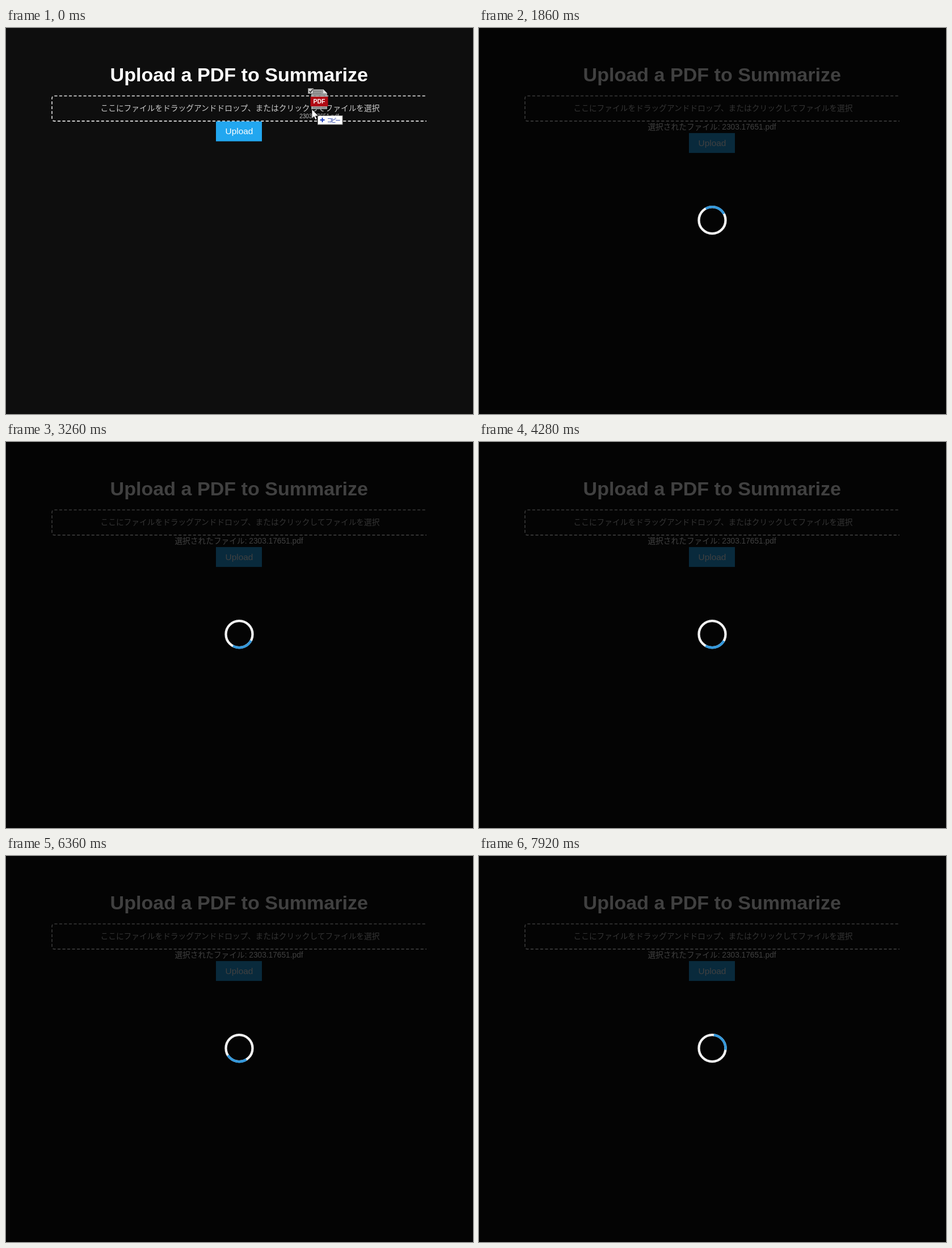
These frames come from a looping animation (823x680 px, 8000 ms). An HTML page:

```html
<!DOCTYPE html>
<html lang="ja">
<head>
<meta charset="utf-8">
<title>Upload a PDF to Summarize</title>
<style>
  html, body { margin: 0; width: 100%; height: 100%; overflow: hidden; background: #0e0e0e; }
  svg { display: block; width: 823px; height: 680px; }
  text { font-family: "Liberation Sans", Arial, "Noto Sans CJK JP", "Noto Sans CJK", sans-serif; font-size: 13.71px; fill: #fff; text-anchor: middle; }
  .title { font-size: 34.1px; font-weight: bold; }
  .hint { fill: #ccc; }
  .button { font-size: 15.43px; }
  .border { fill: none; stroke: #ccc; stroke-width: 1.8; stroke-dasharray: 5.14 3.39; }
  .border.back { stroke-dashoffset: 5.14; }
  .ring { fill: none; stroke: #f3f3f3; stroke-width: 4.3; }
  .arc { stroke: #3498db; stroke-dasharray: 1 3; }
  .badge { font-size: 10.5px; font-weight: bold; }
  .filename { font-size: 10px; fill: #bbb; }
  .copy { font-size: 9.5px; fill: #16309c; letter-spacing: -2.2px; }
</style>
</head>
<body>
<svg viewBox="0 0 823 680">
  <rect width="823" height="680" fill="#0e0e0e"/>
  <text class="title" x="410.8" y="94">Upload a PDF to Summarize</text>
  <path class="border" d="M85.3 119.6H741"/>
  <path class="border back" d="M85.3 119.6A4.3 4.3 0 0 0 81 123.9V159.7A4.3 4.3 0 0 0 85.3 164H741"/>
  <text class="hint" x="412.5" y="146">ここにファイルをドラッグアンドドロップ、またはクリックしてファイルを選択</text>
  <text id="chosen" x="410.5" y="179">選択されたファイル: 2303.17651.pdf</text>
  <g id="button">
    <rect x="370" y="164.6" width="81" height="35" fill="#22a7f0"/>
    <text class="button" x="411" y="187">Upload</text>
  </g>

  <g id="drag">
    <path d="M538 108H559L566 115V143H538Z" fill="#b4b4b4" opacity=".85"/>
    <path d="M559 108V115H566Z" fill="#e2e2e2"/>
    <path d="M542 112H556M542 115.5H556M542 118.5H562M541 140.5H563" stroke="#777" fill="none"/>
    <rect x="536.5" y="121" width="31" height="17" fill="#b00a14"/>
    <text class="badge" x="552" y="133.3">PDF</text>
    <rect x="532.5" y="106.5" width="9" height="9" fill="#ccc" stroke="#777"/>
    <path d="M534.5 111L536.5 113.5L540.5 108" fill="none" stroke="#222" stroke-width="1.3"/>
    <text class="filename" x="552" y="158.5">2303.17651.pdf</text>
    <rect x="549.5" y="154.5" width="43.5" height="15.5" fill="#fff" stroke="#888"/>
    <path d="M553.5 162H561.5M557.5 158V166" stroke="#1a3bb8" stroke-width="2"/>
    <text class="copy" x="576.5" y="165.5">コピー</text>
  </g>

  <g id="loading">
    <rect width="823" height="680" fill="#000" fill-opacity=".75"/>
    <g transform="translate(411 338.7)">
      <circle class="ring" r="23.5"/>
      <circle id="arc" class="ring arc" r="23.5" pathLength="4"/>
    </g>
  </g>
  <path id="cursor" d="M0 0V16.5L3.8 13L6.3 18.7L9 17.5L6.5 12H11.7Z" fill="#fff" stroke="#000" stroke-width=".8"/>
</svg>
<script>
  const LOOP = 8000, DROP = 60, CHOSEN = 130, CLICK = 880, LEAVE = 1200, GONE = 1660;
  const dropSpot = [539, 143], buttonSpot = [437, 205], exitSpot = [791, 586];
  const part = id => document.getElementById(id);
  const [chosen, button, drag, loading, arc, cursor] =
    ['chosen', 'button', 'drag', 'loading', 'arc', 'cursor'].map(part);

  const clamp = (v, lo, hi) => Math.min(hi, Math.max(lo, v));
  const show = (el, on) => el.setAttribute('visibility', on ? 'visible' : 'hidden');
  const mix = (a, b, k) => a.map((v, i) => v + (b[i] - v) * k);
  const smooth = k => k * k * (3 - 2 * k);

  function cursorAt(t, tick) {
    if (t < CLICK) {
      const step = clamp(Math.floor((t - 355) / 75), 0, 5);
      return mix(dropSpot, buttonSpot, smooth(step / 5));
    }
    const k = clamp((tick * 1000 / 15 - LEAVE) / 400, 0, 1);
    return mix(buttonSpot, exitSpot, smooth(k));
  }

  function draw() {
    const t = performance.now() % LOOP;
    const tick = Math.floor(t * 15 / 1000 + 0.2); // 15 pictures per second
    show(drag, t < DROP);
    show(chosen, t >= CHOSEN);
    button.setAttribute('transform', `translate(0 ${t >= CHOSEN ? 20.5 : 0})`);
    show(loading, t >= CLICK);
    arc.setAttribute('transform', `rotate(${tick * 24.13 - 74.5})`);
    show(cursor, t < GONE);
    cursor.setAttribute('transform', `translate(${cursorAt(t, tick)})`);
    requestAnimationFrame(draw);
  }
  draw();
</script>
</body>
</html>
```
